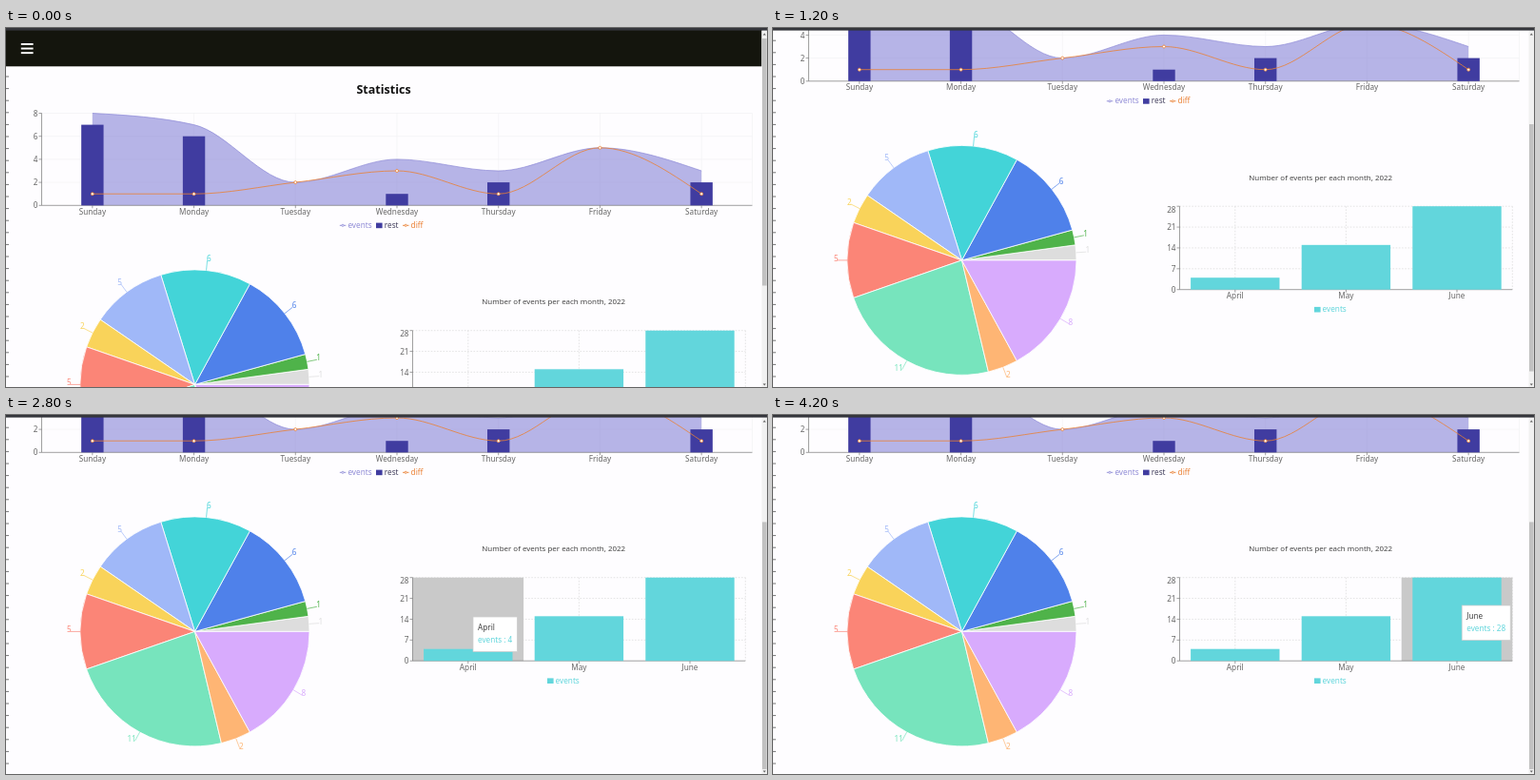
An HTML page with a canvas for the animation above (4.3 s loop, 800x377 px).

```html
<!DOCTYPE html>
<html lang="en">
<head>
<meta charset="utf-8">
<title>Statistics</title>
<style>
  html, body { margin: 0; width: 100%; height: 100%; overflow: hidden; background: #fefdff; }
  canvas { display: block; }
</style>
</head>
<body>
<canvas id="stage" width="800" height="377"></canvas>
<script>
const ctx = document.getElementById('stage').getContext('2d');
const LOOP = 4300, STEP = 100;
const FONT = '"Noto Sans", "Open Sans", sans-serif';
const TEAL = '#62d6dc', AXIS = '#777', LABEL = '#666', INDIGO = '#403ca0', LILAC = '#8f8bd6', ORANGE = '#ea8034';

const week = {
  days: ['Sunday', 'Monday', 'Tuesday', 'Wednesday', 'Thursday', 'Friday', 'Saturday'],
  events: [8, 7, 2, 4, 3, 5, 3],
  rest: [7, 6, 0, 1, 2, 0, 2],
  diff: [1, 1, 2, 3, 1, 5, 1],
  left: 37.5, right: 784.5, top: 89.5, base: 186.3, max: 8
};
const slices = [
  [1, '#dddddd'], [1, '#4fb34a'], [6, '#4f81ea'], [6, '#43d4d8'], [5, '#a0b8f8'],
  [2, '#f9d35a'], [5, '#fb8577'], [11, '#77e4bd'], [2, '#feb574'], [8, '#d8abfd']
];
const months = {
  names: ['April', 'May', 'June'], counts: [4, 15, 28],
  left: 427.5, right: 777.3, top: 317.7, base: 405.2, max: 28
};
// Pointer stops over the month chart: start time, month index, tooltip y
const hovers = [[2500, 0, 212], [3150, 1, 215], [3750, 2, 200]];
const scrollKeys = [[1000, 0], [1100, 12.5], [1200, 130.5], [1300, 147]];

const lerp = (a, b, p) => a + (b - a) * p;
const bandWidth = (c, n) => (c.right - c.left) / n;
const bandCenter = (c, n, i) => c.left + bandWidth(c, n) * (i + 0.5);
const valueY = (c, v) => c.base - (c.base - c.top) * v / c.max;

function rect(x, y, w, h, color) {
  ctx.fillStyle = color;
  ctx.fillRect(x, y, w, h);
}

function line(x1, y1, x2, y2, color, width = 0.7, dash = []) {
  ctx.setLineDash(dash);
  ctx.strokeStyle = color;
  ctx.lineWidth = width;
  ctx.beginPath();
  ctx.moveTo(x1, y1);
  ctx.lineTo(x2, y2);
  ctx.stroke();
  ctx.setLineDash([]);
}

// y is the middle of the capital letters
function text(str, x, y, color, align = 'left', size = 8.2, weight = 400) {
  ctx.font = `${weight} ${size}px ${FONT}`;
  ctx.textAlign = align;
  ctx.fillStyle = color;
  ctx.fillText(str, x, y + size * 0.36);
}

function dot(x, y, r, color) {
  ctx.beginPath();
  ctx.arc(x, y, r, 0, Math.PI * 2);
  ctx.fillStyle = '#fff';
  ctx.fill();
  ctx.strokeStyle = color;
  ctx.lineWidth = 0.8;
  ctx.stroke();
}

// Monotone cubic through equally spaced values
function curve(values) {
  const n = values.length, h = bandWidth(week, n);
  const slope = values.slice(1).map((v, i) => v - values[i]);
  const tan = values.map((_, i) => {
    if (i === 0 || i === n - 1) return 0;
    const a = slope[i - 1], b = slope[i];
    return (Math.sign(a) + Math.sign(b)) * Math.min(Math.abs(a), Math.abs(b), Math.abs(a + b) / 4);
  });
  tan[0] = (3 * slope[0] - tan[1]) / 2;
  tan[n - 1] = (3 * slope[n - 2] - tan[n - 2]) / 2;
  const x = i => bandCenter(week, n, i), y = v => valueY(week, v);
  ctx.beginPath();
  ctx.moveTo(x(0), y(values[0]));
  for (let i = 1; i < n; i++) {
    ctx.bezierCurveTo(x(i - 1) + h / 3, y(values[i - 1] + tan[i - 1] / 3),
      x(i) - h / 3, y(values[i] - tan[i] / 3), x(i), y(values[i]));
  }
}

function axes(c, names, step) {
  line(c.left, c.base, c.right, c.base, AXIS);
  line(c.left, c.top, c.left, c.base, AXIS);
  for (let v = 0; v <= c.max; v += step) {
    const y = valueY(c, v);
    line(c.left - 3, y, c.left, y, AXIS);
    text(v, c.left - 4, y + (v === 28 ? 3.4 : 0.2), LABEL, 'right');
  }
  names.forEach((name, i) => {
    const x = bandCenter(c, names.length, i);
    line(x, c.base, x, c.base + 3, AXIS);
    text(name, x, c.base + 6.7, LABEL, 'center');
  });
}

function grid(c, n, step, color, dash) {
  for (let v = step; v <= c.max; v += step) {
    line(c.left, valueY(c, v), c.right, valueY(c, v), color, 0.7, dash);
  }
  for (let i = 0; i < n; i++) {
    const x = bandCenter(c, n, i);
    line(x, c.top, x, c.base, color, 0.7, dash);
  }
  line(c.right, c.top, c.right, c.base, color, 0.7, dash);
}

function lineKey(x, y, label, color) {
  line(x, y, x + 6.5, y, color, 0.9);
  dot(x + 3.2, y, 1.1, color);
  text(label, x + 8.6, y - 0.3, color);
}

function drawWeek() {
  const n = week.days.length;
  text('Statistics', 397, 64, '#111', 'center', 12.5, 700);
  grid(week, n, 2, '#f3f2f4');

  curve(week.events);
  ctx.strokeStyle = LILAC;
  ctx.lineWidth = 0.7;
  ctx.stroke();
  ctx.lineTo(bandCenter(week, n, n - 1), week.base);
  ctx.lineTo(bandCenter(week, n, 0), week.base);
  ctx.fillStyle = 'rgba(136,132,216,0.6)';
  ctx.fill();
  axes(week, week.days, 2);

  week.rest.forEach((v, i) => {
    const y = valueY(week, v);
    rect(bandCenter(week, n, i) - 11.7, y, 23.4, week.base - y, INDIGO);
  });
  curve(week.diff);
  ctx.strokeStyle = ORANGE;
  ctx.lineWidth = 0.8;
  ctx.stroke();
  week.diff.forEach((v, i) => dot(bandCenter(week, n, i), valueY(week, v), 1.5, ORANGE));

  lineKey(350.8, 207.3, 'events', LILAC);
  rect(389, 204.6, 6.6, 5.6, INDIGO);
  text('rest', 397.8, 207, '#44415f');
  lineKey(417, 207.3, 'diff', ORANGE);
}

function drawPie() {
  const cx = 198.5, cy = 374.4, r = 120.5, tip = 131;
  const unit = Math.PI * 2 / slices.reduce((sum, s) => sum + s[0], 0);
  let from = 0;
  for (const [value, color] of slices) {
    const to = from + value * unit, mid = (from + to) / 2;
    ctx.beginPath();
    ctx.moveTo(cx, cy);
    ctx.arc(cx, cy, r, -from, -to, true);
    ctx.closePath();
    ctx.fillStyle = color;
    ctx.fill();
    ctx.strokeStyle = '#fff';
    ctx.lineWidth = 0.8;
    ctx.stroke();
    from = to;

    const cos = Math.cos(mid), sin = -Math.sin(mid);
    const x = cx + tip * cos, y = cy + tip * sin;
    line(cx + r * cos, cy + r * sin, x, y, color);
    text(value, x + (cos > 0 ? -0.6 : 1.2), y - 2, color, cos > 0 ? 'left' : 'right');
  }
}

function drawMonths(active) {
  const n = months.names.length, band = bandWidth(months, n);
  text('Number of events per each month, 2022', 575.7, 287.3, '#444', 'center', 7.95);
  grid(months, n, 7, '#d9d9d9', [1.6, 1.6]);
  if (active >= 0) {
    rect(months.left + band * active, months.top, band, months.base - months.top, '#c9c9c9');
  }
  axes(months, months.names, 7);
  months.counts.forEach((v, i) => {
    const y = valueY(months, v);
    rect(bandCenter(months, n, i) - 46.7, y, 93.4, months.base - y, TEAL);
  });
  rect(569, 423.4, 6.6, 5.6, TEAL);
  text('events', 577.6, 425.8, TEAL);
}

function drawTooltip(t, index) {
  const [start, month, targetY] = hovers[index];
  const spot = m => bandCenter(months, 3, m) + 5.2;
  let x = spot(month), y = targetY;
  if (index > 0) {
    const p = Math.min(1, (t - start) / 400), ease = 1 - (1 - p) ** 3;
    x = lerp(spot(hovers[index - 1][1]), x, ease);
    y = lerp(hovers[index - 1][2], y, ease);
  }
  const label = `events : ${months.counts[month]}`;
  ctx.font = `8.2px ${FONT}`;
  const width = ctx.measureText(label).width + 10;
  rect(x, y, width, 36.5, '#fff');
  ctx.strokeStyle = '#ccc';
  ctx.lineWidth = 0.7;
  ctx.strokeRect(x, y, width, 36.5);
  text(months.names[month], x + 5, y + 11, '#444');
  text(label, x + 5, y + 24.5, TEAL);
}

function arrow(y, dir) {
  ctx.fillStyle = '#606060';
  ctx.beginPath();
  ctx.moveTo(795.7, y);
  ctx.lineTo(798.9, y);
  ctx.lineTo(797.3, y + 2 * dir);
  ctx.fill();
}

function drawFrame(scroll) {
  rect(794.5, 2.5, 5.5, 374.5, '#f1f1f1');
  rect(795, 11 + scroll * 0.69, 4.6, 259.5, '#c1c1c1');
  arrow(7.5, -1);
  arrow(373.5, 1);
  rect(0, 0, 800, 2.6, '#34353b');
}

function scrollAt(t) {
  const next = scrollKeys.findIndex(k => t < k[0]);
  if (next === 0) return 0;
  if (next < 0) return scrollKeys[scrollKeys.length - 1][1];
  const [t0, s0] = scrollKeys[next - 1], [t1, s1] = scrollKeys[next];
  return lerp(s0, s1, (t - t0) / (t1 - t0));
}

function draw(t) {
  const scroll = scrollAt(t);
  const hover = hovers.filter(h => t >= h[0]).length - 1;
  rect(0, 0, 800, 377, '#fefdff');
  for (let y = 0.6; y < 377; y += 12.6) line(0, y, 3, y, '#555', 0.8);

  ctx.save();
  ctx.translate(0, -scroll);
  drawWeek();
  drawPie();
  drawMonths(hover < 0 ? -1 : hovers[hover][1]);
  rect(0, 0, 794.5, 40.3, '#14150d');
  for (let i = 0; i < 3; i++) rect(15.8, 16 + i * 4.6, 12.8, 1.9, '#fff');
  ctx.restore();

  if (hover >= 0) drawTooltip(t, hover);
  drawFrame(scroll);
}

const began = performance.now();
function tick() {
  const t = (performance.now() - began) % LOOP;
  draw(Math.floor(t / STEP) * STEP);
  requestAnimationFrame(tick);
}
tick();
</script>
</body>
</html>
```
